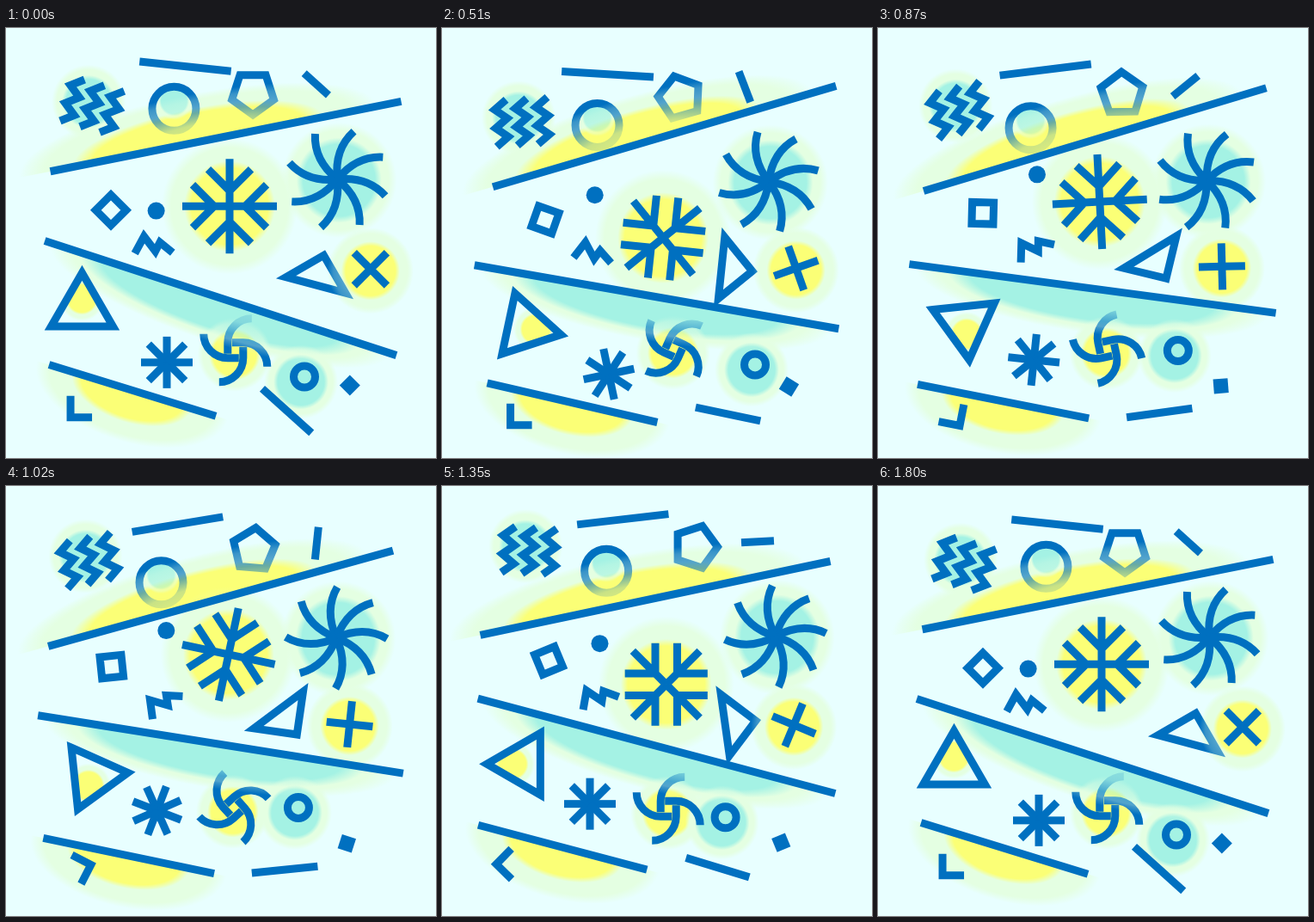
Recreate the animation shown at these times as an HTML page with a canvas. Size 500 by 500 pixels, loop 1.83 s.

```html
<!DOCTYPE html>
<html>
<head>
<meta charset="utf-8">
<style>
html, body { margin: 0; height: 100%; overflow: hidden; background: #e8ffff; }
canvas { display: block; width: 100vw; height: 100vh; }
</style>
</head>
<body>
<canvas id="stage" width="500" height="500"></canvas>
<script>
const c = document.getElementById('stage').getContext('2d');
const BLUE = '#0070c0', YELLOW = '251,255,118', TEAL = '164,242,228', HALO = '228,255,226';
const LOOP = 1830, SPAN = 1800, STEP = 30, RAD = Math.PI / 180;
let now = 0;

// A value sways around its mean; a second pair of arguments adds a sway of double speed
const sway = (mean, amp, peak, amp2 = 0, peak2 = 0) => () => {
  const deg = 360 * now / SPAN;
  return mean + amp * Math.cos((deg - peak) * RAD) + amp2 * Math.cos((2 * deg - peak2) * RAD);
};
const spin = (from, total) => () => from + total * now / SPAN;
const fixed = v => () => v;
const still = fixed(0);
const pose = (x, y, turn = still) => ({ x, y, turn });

function place(p, draw) {
  c.save();
  c.translate(p.x(), p.y());
  c.rotate(p.turn() * RAD);
  draw();
  c.restore();
}

function poly(n, r) {
  const p = new Path2D();
  for (let i = 0; i < n; i++) p.lineTo(r * Math.cos(i * 360 / n * RAD), r * Math.sin(i * 360 / n * RAD));
  p.closePath();
  return p;
}
function ring(r) {
  const p = new Path2D();
  p.arc(0, 0, r, 0, 7);
  return p;
}
function zigzags() {
  const p = new Path2D();
  for (const x of [-24, 0, 24])
    for (let i = 0; i < 6; i++) p[i ? 'lineTo' : 'moveTo'](x + (i % 2 ? -7 : 7), -27 + i * 10.8);
  return p;
}
const stroke = (p, path) => place(p, () => c.stroke(path));
const fill = (p, path) => place(p, () => c.fill(path));
const arms = (p, n, path) => place(p, () => {
  for (let i = 0; i < n; i++) { c.stroke(path); c.rotate(360 / n * RAD); }
});
const bar = (p, len) => stroke(p, new Path2D(`M${-len / 2} 0H${len / 2}`));

// Flat core with a pale rim; a veil is the see-through version laid over shapes
function glow(rgb, r, R, veil) {
  const g = c.createRadialGradient(0, 0, 0, 0, 0, R), k = r / R;
  const stop = (pos, col, alpha) => g.addColorStop(pos, `rgba(${col},${alpha})`);
  stop(0, rgb, veil ? .9 : 1);
  stop(k * .55, rgb, veil ? .8 : 1);
  stop(k * .93, rgb, veil ? .42 : 1);
  stop(k * 1.1, HALO, veil ? .36 : 1);
  stop(.86, HALO, veil ? .25 : 1);
  stop(1, HALO, 0);
  c.fillStyle = g;
  c.fillRect(-R, -R, 2 * R, 2 * R);
  c.fillStyle = BLUE;
}
const halo = (p, rgb, r, R, dx = 0, dy = 0, veil) => place({ ...p, turn: still }, () => {
  c.translate(dx, dy);
  glow(rgb, r, R, veil);
});
// Half ellipse of light on one side of a line
const band = (p, rgb, side, dx, r, R, flat, veil) => place(p, () => {
  c.beginPath();
  c.rect(-300, side < 0 ? -100 : 0, 600, 100);
  c.clip();
  c.translate(dx, 0);
  c.scale(1, flat);
  glow(rgb, r, R, veil);
});

const topLine = pose(sway(253.6, 5.9, 71), sway(128, 3.1, 232), sway(-13.9, 3.3, -37));
const midLine = pose(fixed(249.5), sway(308.2, 8.3, 45), sway(12.9, 5.5, -21));
const lowLine = pose(sway(146, 5.9, 80), sway(427.4, 9.4, 130), sway(14.2, 3, -12));
const topBar = pose(sway(202, 10.5, -52), sway(46.2, 7.6, 102), sway(-.8, 9, 40));
const lowBar = pose(sway(326.6, 6.1, 90), sway(446.2, 2.8, 112), sway(17, 25, 0));
const dash = pose(sway(359.5, 7.6, -80), sway(66.4, 2, 120), spin(42, -540));
const penta = pose(sway(285.8, 9.1, -82), sway(75.8, 5, 95), spin(90, 72));
const hoop = pose(sway(186.7, 9.8, -27), sway(104.8, 12.5, 151));
const waves = pose(sway(97.4, 4.7, -54), sway(92.2, 17.2, 95), sway(1.2, 15, -6));
const flake = pose(sway(259, 2, -60), sway(220, 7.3, 56, 19, 208), spin(0, 180));
const fan = pose(sway(383.9, 4.1, -70), sway(176.7, 2, 110), spin(19, -270));
const box = pose(sway(122, 2, -90), sway(213, 10, 97), spin(0, -90));
const dot = pose(sway(180, 6.4, 213), sway(191, 23, 20));
const spark = pose(sway(179, 9.3, 219), sway(261.5, 8.8, 89), sway(-13, 21, 45, 7.5, 222));
const wedge = pose(sway(344, 20, 0), sway(278.8, 6.5, 27), sway(127, 67, 180));
const cross = pose(sway(411.7, 12.4, 12), sway(278.8, 1.8, 30), spin(45, 90));
const tri = pose(sway(95, 6.7, 168), sway(334.8, 14.4, 126), spin(30, 360));
const star = pose(sway(183.5, 12, 73), sway(386.5, 17, 82), spin(0, -360));
const wheel = pose(sway(266.5, 3.3, 85), sway(374, 1.5, -60), spin(0, 720));
const donut = pose(sway(347, 17.4, 90), sway(390, 16.2, 17));
const chip = pose(sway(399, 4.8, 80), sway(415.8, 1.2, 110), spin(0, 270));
// Rests, then makes one turn
const elbow = pose(sway(86, 6, 80), sway(444.3, 5.9, 127),
  () => -360 * Math.min(1, Math.max(0, (now - 710) / 730)));

const wavePath = zigzags();
const flakeArm = new Path2D('M0 0V-55M-25 -43L0 -18L25 -43');
const fanArm = new Path2D('M0 0Q32 -15 59 0');
const wheelArm = new Path2D('M-9 4V-9A28 28 0 0 1 19 -37');
const sparkPath = new Path2D('M-22 -1L-10 -20L2 -2L8 -12L22 1');
const wedgePath = new Path2D('M-14.8 -14.8H35.8L-14.8 35.8Z');
const elbowPath = new Path2D('M-12 -13V12H13');
const triPath = poly(3, 41.5);

function bands(veil) {
  band(topLine, YELLOW, -1, -32, 135, 212, .265, veil);
  band(midLine, TEAL, 1, 0, 155, 208, .25, veil);
}

function draw() {
  c.fillStyle = '#e8ffff';
  c.fillRect(0, 0, 500, 500);
  c.fillStyle = c.strokeStyle = BLUE;
  c.lineWidth = 9;

  bands();
  band(lowLine, YELLOW, 1, 0, 66, 116, .52);
  halo(waves, TEAL, 28, 43, -4, -5);
  halo(hoop, TEAL, 16, 22, 0, -9);
  halo(fan, TEAL, 45, 67, 2, 1);
  halo(flake, YELLOW, 48, 79);
  halo(cross, YELLOW, 31, 50, 0, 2);
  halo(wheel, YELLOW, 27, 43, -1, 5);
  halo(donut, TEAL, 29, 43, -4, 6);

  stroke(hoop, ring(25.5));
  stroke(penta, poly(5, 25.6));
  arms(wheel, 4, wheelArm);
  stroke(wedge, wedgePath);
  bands(true);
  halo(cross, YELLOW, 31, 50, 0, 2, true);

  place(tri, () => {
    c.save();
    c.clip(triPath);
    c.translate(-6, -10);
    glow(YELLOW, 17, 26);
    c.restore();
    c.stroke(triPath);
  });

  bar(topLine, 416);
  bar(midLine, 430);
  bar(lowLine, 203);
  bar(topBar, 107);
  bar(lowBar, 77);
  bar(dash, 38);
  stroke(waves, wavePath);
  arms(flake, 4, flakeArm);
  arms(fan, 8, fanArm);
  stroke(box, poly(4, 17.7));
  fill(dot, ring(10));
  stroke(spark, sparkPath);
  arms(cross, 4, new Path2D('M0 0H27'));
  arms(star, 8, new Path2D('M0 0H30'));
  stroke(donut, ring(12.5));
  fill(chip, poly(4, 12));
  stroke(elbow, elbowPath);
}

const start = performance.now();
function tick() {
  now = Math.floor((performance.now() - start) % LOOP / STEP) * STEP;
  draw();
  requestAnimationFrame(tick);
}
tick();
</script>
</body>
</html>
```
